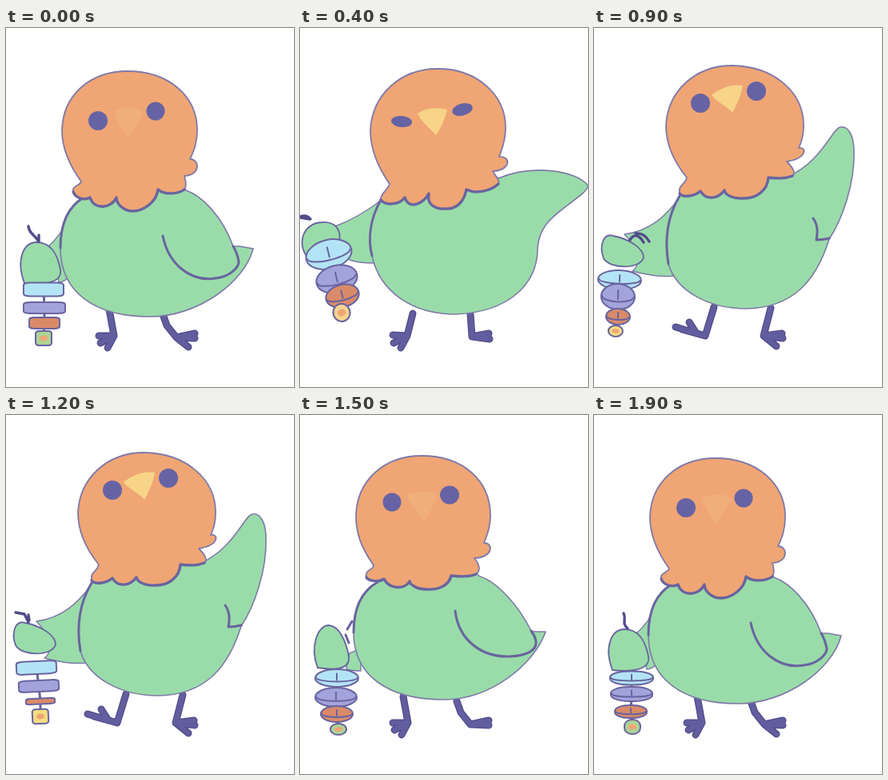
An HTML page with a canvas for the animation above (2000 ms loop, 360 px wide and 449 px high).

```html
<!DOCTYPE html>
<html lang="en">
<head>
<meta charset="utf-8">
<title>Waving bird</title>
<style>
html, body { margin: 0; width: 100%; height: 100%; overflow: hidden; background: #fff; }
canvas { display: block; }
</style>
</head>
<body>
<canvas id="stage" width="360" height="449"></canvas>
<script>
const ctx = document.getElementById('stage').getContext('2d');
const LOOP = 2000, STEP = 100;
const INK = '#69649f', EDGE = '#7f7aa8', DARK = '#514c88', GREEN = '#99dca9', ORANGE = '#f0a574';
const TOY_COLORS = ['#b3e4f5', '#a3a3dc', '#d98a69'];

// Poses share the same path structure, so every number in them can be blended.
// eyes: x y rx ry angle; toy: tilt roundness, then x y rx ry per bead.
const rest = {
  head: 'M84 205 C82 197 92 198 94 192 C78 170 70 150 70 128 C71 84 105 54 152 54 C202 54 239 84 239 128 C239 145 234 155 230 164 C242 164 244 184 223 185 C225 192 226 198 223 202 C215 208 198 209 190 202 C188 218 172 229 158 229 C147 229 138 220 138 212 C132 226 110 228 105 212 C98 216 87 213 84 205Z',
  body: 'M97 212 C75 225 68 250 68 275 C68 330 110 361 180 361 C240 361 298 318 309 276 C303 275 297 274 292 273 C289 273 287 273 284 273 C270 235 245 210 225 203 L160 150Z',
  arm: 'M80 240 C70 252 64 264 54 272 C58 280 62 300 66 318 C70 318 75 315 78 312Z',
  hand: 'M23 319 C12 290 22 268 38 268 C56 268 64 282 68 302 C71 321 42 321 23 319Z',
  legs: 'M129 352 L135 385 L116 385 M135 385 L118 394 M135 385 L127 400 M196 358 L201 372 L213 387 L236 382 M213 387 L236 388 M213 387 L228 399',
  beak: 'M136 103 C150 98 165 98 172 105 C165 118 158 130 153 138 C148 128 136 115 136 103Z',
  beakColor: 'rgb(240 174 122)',
  tailColor: 'rgb(172 212 150)',
  eyes: '115 116 12 12 0 187 104 11.5 11.5 0',
  toy: '0 .35 47 327 25 8.5 48 350 26 7 48 369 19 7 47 388 10 9',
  mark: 'M196 260 C203 295 230 318 262 313 C280 311 290 300 291 293 C290 285 288 280 284 273',
  stem: 'M28 248 C29 258 36 258 40 266 M41 259 L41 267'
};
const settle = {
  ...rest,
  head: 'M83 203 C80 194 92 194 92 188 C76 165 70 148 70 126 C71 82 105 51 152 51 C204 51 238 82 238 126 C238 143 233 152 230 160 C242 160 242 178 218 179 C225 188 226 195 220 199 C212 203 198 202 189 201 C186 214 172 219 158 218 C147 218 138 213 137 208 C132 218 112 219 105 205 C98 210 84 207 83 203Z',
  body: 'M97 209 C74 222 67 246 67 272 C67 326 110 356 180 356 C238 356 293 312 307 271 C303 271 299 271 296 271 C293 271 291 271 289 270 C272 236 245 208 225 202 L160 150Z',
  arm: 'M76 292 C70 295 66 296 62 298 C60 305 58 315 58 318 C65 320 70 320 76 320Z',
  hand: 'M22 316 C12 290 22 263 36 263 C50 264 58 285 61 302 C63 320 40 319 22 316Z',
  beak: 'M132 100 C145 95 160 95 172 99 C168 112 162 123 155 132 C148 124 138 112 132 100Z',
  eyes: '115 109 11.5 11.5 0 187 100 12 11.5 0',
  toy: '0 1 46 329 27 11 45 353 26 12 46 374 20 10 48 393 10 7',
  mark: 'M194 245 C198 280 225 303 262 302 C283 301 296 295 295 283 C294 278 292 274 289 270 M59 268 L65 258 M57 275 L61 285',
  stem: ''
};
const squint = {
  head: 'M101 215 C100 207 110 203 112 195 C96 172 88 150 88 128 C90 84 125 51 172 51 C222 51 257 84 257 125 C257 142 252 152 249 161 C264 160 264 178 241 179 C246 188 250 190 248 195 C238 204 220 208 208 202 C205 218 195 227 182 226 C168 227 158 220 161 207 C154 220 136 228 131 212 C124 222 106 222 101 215Z',
  body: 'M101 215 C87 240 85 265 90 285 C100 330 140 358 195 358 C262 355 297 320 297 275 C299 250 313 238 330 225 C350 210 360 203 360 197 C345 178 290 170 248 188 L160 150Z',
  arm: 'M102 215 C85 228 66 240 44 248 C50 262 45 280 62 290 C70 293 80 294 92 294Z',
  hand: 'M9 287 C-6 264 8 243 28 243 C44 242 52 252 49 268 C44 278 25 280 9 287Z',
  legs: 'M141 357 L134 385 L116 384 M134 385 L117 394 M134 385 L126 400 M213 358 L215 386 L236 382 M215 386 L237 389 M215 386 L223 399',
  beak: 'M147 107 C158 99 172 99 184 102 C181 115 176 125 170 134 C163 126 152 118 147 107Z',
  beakColor: 'rgb(247 212 135)',
  tailColor: 'rgb(246 212 140)',
  eyes: '127 117 13 7 5 203 102 13 7.5 -15',
  toy: '-14 1 36 283 29 18 46 314 26 17 53 335 21 14 52 356 10.5 11',
  mark: '',
  stem: 'M0 236 C5 234 10 235 13 239 M0 237 L12 239'
};
const reach = {
  head: 'M107 207 C105 195 114 197 116 187 C98 165 90 145 90 122 C92 80 125 47 173 47 C225 48 262 80 262 122 C262 138 258 145 256 150 C266 148 267 163 241 167 C250 176 252 182 248 185 C238 189 228 188 218 187 C217 204 202 213 188 213 C172 214 164 208 163 203 C155 214 140 216 133 204 C126 210 112 213 107 207Z',
  body: 'M107 210 C92 235 88 265 93 295 C103 330 145 351 190 351 C250 350 278 315 294 264 C288 262 288 256 285 250 C310 256 350 253 400 250 C385 215 320 183 225 187 L160 150Z',
  arm: 'M107 212 C90 235 70 254 38 258 C55 275 60 295 48 304 C65 308 80 312 100 310Z',
  hand: 'M12 288 C6 272 12 256 24 260 C45 264 62 276 62 287 C58 302 20 302 12 288Z',
  legs: 'M150 349 L139 385 L102 374 M139 385 L110 377 M128 382 L119 368 M221 350 L212 385 L235 382 M212 385 L236 388 M212 385 L228 398',
  beak: 'M147 84 C158 75 172 70 186 72 C184 85 178 97 173 106 C166 97 152 92 147 84Z',
  beakColor: 'rgb(247 212 135)',
  tailColor: 'rgb(244 220 130)',
  eyes: '133 94 12 12 0 203 79 12 12 0',
  toy: '10 .9 30 306 25 9 35 326 25 10 37 337 18 17 44 348 10 10',
  mark: 'M274 238 C281 248 279 258 278 265 C284 265 290 264 294 263',
  stem: 'M41 256 L46 248 L45 256'
};
const raised = {
  ...reach,
  body: 'M107 210 C92 235 88 265 93 295 C103 330 145 351 190 351 C250 350 278 315 294 264 C310 240 326 195 325 155 C325 135 318 122 308 124 C298 125 285 168 240 187 L160 150Z',
  toy: '2 1 32 315 27 12 30 336 21 16 30 361 15 10 27 379 9 7',
  stem: 'M45 265 C50 257 56 258 62 268 M52 257 C60 256 65 260 69 267'
};
const spun = {
  ...raised,
  toy: '-3 .35 38 316 25 8 41 339 25 7 43 358 18 3.5 43 377 10 9',
  stem: 'M12 247 L23 249 L28 259 M28 250 L29 257'
};

const timeline = [
  [0, rest], [100, rest], [400, squint], [600, reach], [700, reach], [900, raised], [1200, spun],
  [1350, { ...spun, body: squint.body }], [1500, settle],
  [1900, { ...rest, toy: '0 .9 47 329 27 8.5 47 349 26 9 46 371 20 8 48 390 10 9', stem: 'M37 248 C41 255 34 260 42 267' }]
];

const NUMBER = /-?\d*\.?\d+/g;
const numbers = text => text.match(NUMBER).map(Number);

function blend(a, b, k) {
  const goal = numbers(b);
  let i = 0;
  return a.replace(NUMBER, n => (+n + (goal[i++] - n) * k).toFixed(2));
}

function poseAt(time) {
  const next = Math.max(1, timeline.findIndex(([at]) => at >= time));
  const [t0, from] = timeline[next - 1], [t1, to] = timeline[next];
  const k = (time - t0) / (t1 - t0);
  const pose = {};
  for (const part in from) {
    const hardChange = part === 'mark' || part === 'stem';
    pose[part] = hardChange ? (k < .5 ? from : to)[part] : blend(from[part], to[part], k);
  }
  return pose;
}

// The open stretch of a path made of its curves first..last, counted from 1.
function stretch(path, first, last) {
  const curves = path.replace(/ L.*|Z/g, '').split('C');
  const start = numbers(curves[first - 1]).slice(-2).join(' ');
  return 'M' + start + ' C' + curves.slice(first, last + 1).join('C');
}

function shape(path, fill, stroke, width) {
  const p = new Path2D(path);
  if (fill) { ctx.fillStyle = fill; ctx.fill(p); }
  if (stroke) { ctx.strokeStyle = stroke; ctx.lineWidth = width; ctx.stroke(p); }
}

function drawEyes(eyes) {
  const v = numbers(eyes);
  ctx.fillStyle = '#6663a4';
  for (let i = 0; i < v.length; i += 5) {
    ctx.beginPath();
    ctx.ellipse(v[i], v[i + 1], v[i + 2], v[i + 3], v[i + 4] * Math.PI / 180, 0, 7);
    ctx.fill();
  }
}

function drawToy(toy, tailColor) {
  const [tilt, round, ...v] = numbers(toy);
  shape(`M${v[0]} ${v[1]} L${v[4]} ${v[5]} L${v[8]} ${v[9]} L${v[12]} ${v[13]}`, null, INK, 3);
  [...TOY_COLORS, tailColor].forEach((color, i) => {
    const [x, y, rx, ry] = v.slice(i * 4, i * 4 + 4);
    ctx.save();
    ctx.translate(x, y);
    ctx.rotate(tilt * Math.PI / 180);
    ctx.beginPath();
    ctx.roundRect(-rx, -ry, rx * 2, ry * 2, { x: rx * round, y: ry * round });
    ctx.fillStyle = color;
    ctx.fill();
    ctx.strokeStyle = INK;
    ctx.lineWidth = 2;
    ctx.stroke();
    if (i === 3) {
      ctx.beginPath();
      ctx.ellipse(0, 0, rx * .5, ry * .4, 0, 0, 7);
      ctx.fillStyle = ORANGE;
      ctx.fill();
    } else if (round > .6) {
      ctx.beginPath();
      ctx.ellipse(0, 0, rx * .94, ry * .4, 0, 0, Math.PI);
      ctx.moveTo(0, -ry * .5);
      ctx.lineTo(0, ry * .2);
      ctx.stroke();
    }
    ctx.restore();
  });
}

function draw(time) {
  const pose = poseAt(time);
  ctx.fillStyle = '#fff';
  ctx.fillRect(0, 0, 360, 449);
  ctx.lineCap = ctx.lineJoin = 'round';
  shape(pose.legs, null, DARK, 9);
  shape(pose.legs, null, '#625d9f', 6.5);
  shape(pose.arm, GREEN, EDGE, 1.4);
  shape(pose.body, GREEN, EDGE, 1.6);
  shape(stretch(pose.body, 1, 1), null, INK, 3);
  shape(pose.mark, null, INK, 3);
  shape(pose.head, ORANGE, EDGE, 1.8);
  shape(stretch(pose.head, 8, 12), null, INK, 3.4);
  shape(pose.beak, pose.beakColor);
  drawEyes(pose.eyes);
  shape(pose.hand, GREEN, INK, 1.8);
  shape(pose.stem, null, DARK, 3.4);
  drawToy(pose.toy, pose.tailColor);
}

function tick() {
  draw(Math.floor(performance.now() % LOOP / STEP) * STEP);
  requestAnimationFrame(tick);
}
tick();
</script>
</body>
</html>
```
